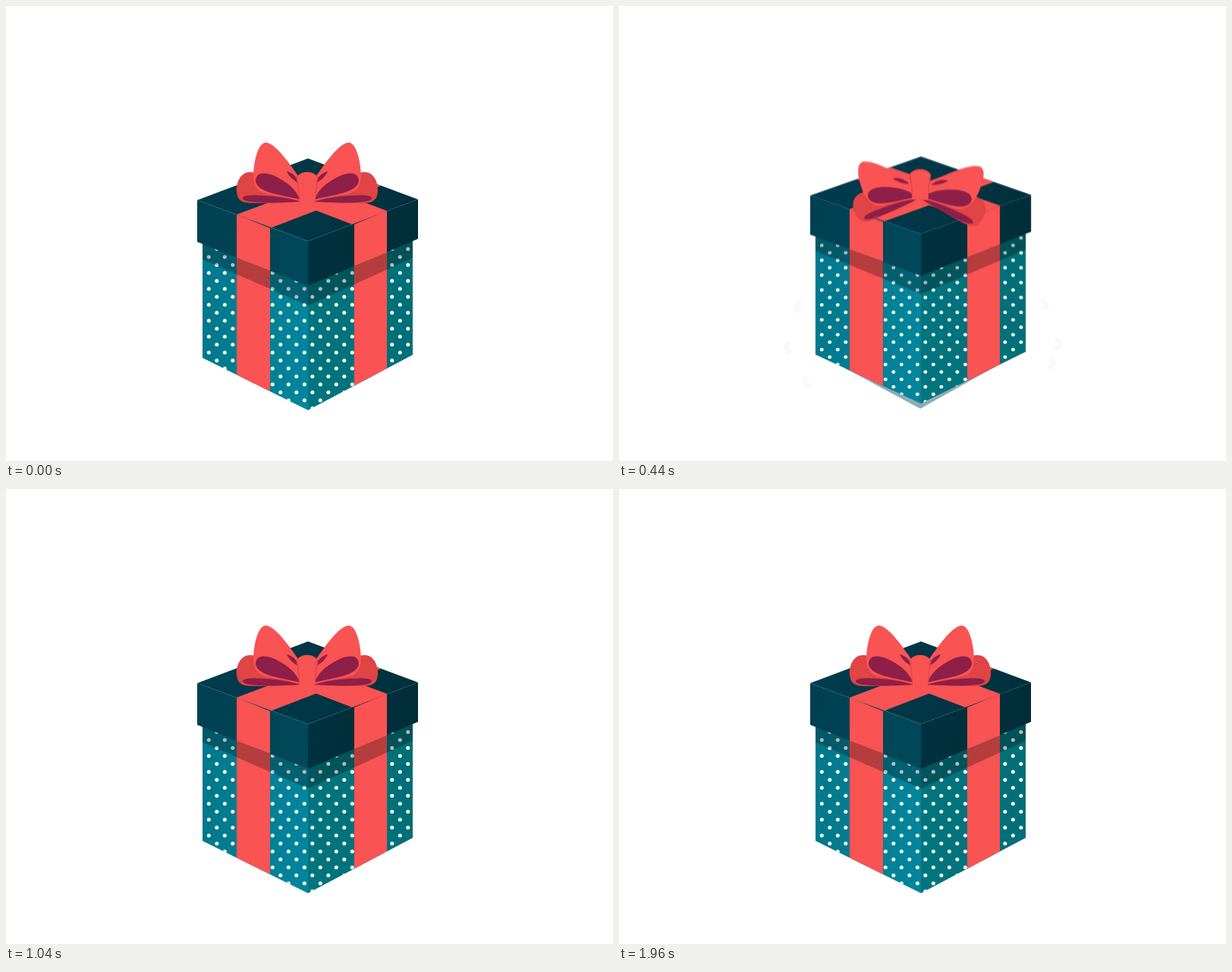
Animation of 800 by 600 pixels, one loop 2 s. Source, as an HTML page with a canvas:

```html
<!DOCTYPE html>
<html lang="en">
<head>
<meta charset="utf-8">
<title>Jumping gift box</title>
<style>
html, body { margin: 0; width: 100%; height: 100%; overflow: hidden; background: #fff; }
canvas { display: block; width: 800px; height: 600px; }
</style>
</head>
<body>
<canvas id="stage" width="800" height="600"></canvas>
<script>
const LOOP = 2000, STEP = 40, SHUTTER = 20, SAMPLES = 8;
const RED = '#f95353', PLUM = '#8e1f49';

// time, scale x, scale y, hop, lid lift, bow turn (degrees), bow scale, shadow scale
const keys = [
  [0, 1, 1, 0, 0, 0, 1, .72],
  [80, .98, 1.02, -9, -15, 0, .98, .85],
  [160, .93, 1.07, -15, -37, 0, .95, 1.02],
  [240, .95, 1.06, -30, -59, 0, .95, 1.18],
  [320, .98, 1, -12, -30, 5, 1, .95],
  [380, 1.03, .92, -3, -12, -14, 1, .72],
  [440, 1, .935, -9, -16.5, -25, 1, .72],
  [500, 1, .97, -2, -5, -12, 1, .72],
  [560, 1, 1, 0, 0, 4, 1, .72],
  [620, 1, 1, 0, 0, 8, 1, .72],
  [720, 1, 1, 0, 0, 0, 1, .72]
];

const screen = document.getElementById('stage').getContext('2d');
const buffer = document.createElement('canvas');
buffer.width = 800;
buffer.height = 600;
const c = buffer.getContext('2d');

// Smooth curve through the keys
function pose(t) {
  const last = keys.length - 1;
  t = Math.max(0, Math.min(t, keys[last][0]));
  let i = 0;
  while (i < last - 1 && t >= keys[i + 1][0]) i++;
  const a = keys[i], b = keys[i + 1], span = b[0] - a[0], u = (t - a[0]) / span;
  const slope = (k, n) => k === 0 || k === last ? 0
    : (keys[k + 1][n] - keys[k - 1][n]) / (keys[k + 1][0] - keys[k - 1][0]);
  return a.map((v, n) => {
    const d = b[n] - v, p = slope(i, n) * span, q = slope(i + 1, n) * span;
    return v + u * (p + u * (3 * d - 2 * p - q + u * (p + q - 2 * d)));
  });
}

function poly(fill, ...pts) {
  c.beginPath();
  for (let i = 0; i < pts.length; i += 2) c.lineTo(pts[i], pts[i + 1]);
  c.closePath();
  c.fillStyle = fill;
  c.fill();
}

function blend(x0, x1, from, to) {
  const g = c.createLinearGradient(x0, 0, x1, 0);
  g.addColorStop(0, from);
  g.addColorStop(1, to);
  return g;
}

function shape(fill, path) {
  c.fillStyle = fill;
  c.fill(new Path2D(path));
}

function body(lift) {
  const top = 290 + lift;
  c.save();
  c.beginPath();
  [[259, top], [398, top + 40], [536, top], [536, 460], [398, 533], [259, 464]]
    .forEach(p => c.lineTo(...p));
  c.clip();
  c.fillStyle = blend(259, 398, '#00788c', '#00869d');
  c.fillRect(250, 200, 148, 340);
  c.fillStyle = blend(398, 536, '#00757f', '#006f77');
  c.fillRect(398, 200, 148, 340);
  c.fillStyle = '#fff';
  for (let i = 0; i < 26; i++) {
    for (let j = -6; j < 10; j++) {
      c.beginPath();
      c.arc(267.3 + 10.5 * i, 331 + 21 * j + 10.5 * (i % 2), 2.5, 0, 7);
      c.fill();
    }
  }
  c.fillStyle = RED;
  c.fillRect(304, 200, 44, 340);
  c.fillRect(459, 200, 43, 340);
  c.translate(0, lift);
  poly('rgba(0,0,0,.27)', 259, 300, 398, 350, 536, 300, 536, 332, 398, 395, 259, 334);
  c.restore();
}

function lid() {
  poly(blend(252, 543, '#003c4f', '#00303d'), 398, 201, 543, 255, 398, 310, 252, 256);
  poly(RED, 304, 275, 450, 220, 494, 237, 348, 293);
  poly(RED, 502, 270, 357, 216, 313, 233, 459, 289);
  poly(blend(252, 398, '#003f50', '#00495a'), 252, 256, 398, 310, 398, 369, 252, 311);
  poly(blend(398, 543, '#00313e', '#002d39'), 398, 310, 543, 255, 543, 307, 398, 369);
  poly(RED, 304, 275, 348, 293, 348, 349, 304, 332);
  poly(RED, 459, 288, 502, 270, 502, 325, 459, 343);
}

function loops(side, turn, size) {
  c.save();
  c.translate(397, 245);
  c.scale(side * size, size);
  c.rotate(turn * Math.PI / 180);
  c.translate(-397, -245);
  shape('#e04444', 'M328 220C311 215 303 231 304 245C305 257 312 260 325 260C345 260 370 259 390 258L380 230Z');
  shape(PLUM, 'M312 254C312 249 325 249 340 250C360 251 375 254 388 258C360 260 314 261 312 254Z');
  shape(RED, 'M387 227C374 208 356 182 343 180C332 180 327 204 326 222C326 243 336 247 350 249C365 251 378 254 390 258Z');
  shape(PLUM, 'M387 255C365 249 330 247 329 230C330 217 345 219 358 226C371 233 383 242 387 255Z');
  shape(PLUM, 'M370 218C377 220 383 224 386 234C379 230 373 225 370 218Z');
  c.restore();
}

function bow(turn, size) {
  loops(1, turn, size);
  loops(-1, turn < 0 ? turn * 1.2 : turn, size);
  shape('#d94444', 'M382.5 227C387 216 407 216 411.500 227C409 240 408 250 408 260L386 260C386 248 385 238 382.500 227Z');
  shape(RED, 'M384 226C388 217 406 217 410 226C408 240 407 250 407 262L387 262C387 248 386 238 384 226Z');
}

// Barely visible dust drifting outwards after the landing
function dust(t) {
  const u = (t - 390) / 650;
  if (u <= 0 || u >= 1) return;
  c.strokeStyle = `rgba(90,150,165,${.05 * (1 - u)})`;
  c.lineWidth = 5;
  for (const a of [-.45, .05, .3, 2.6, 3.05, 3.55]) {
    const r = 150 + 75 * Math.sqrt(u);
    c.beginPath();
    c.arc(400 + r * Math.cos(a), 440 + r * .6 * Math.sin(a), 8 + 14 * u, a - 1, a + 1);
    c.stroke();
  }
}

function scene(t) {
  const [, sx, sy, hop, lift, turn, size, shade] = pose(t);
  c.fillStyle = '#fff';
  c.fillRect(0, 0, 800, 600);
  dust(t);
  const w = 139 * shade, h = 75 * shade;
  poly('#8cadb6', 397 - w, 477, 397, 477 - h, 397 + w, 475, 397, 477 + h);
  c.save();
  c.translate(397.5, 533 + hop);
  c.scale(sx, sy);
  c.translate(-397.5, -533);
  body(lift);
  c.translate(0, lift);
  lid();
  bow(turn, size);
  c.restore();
}

function frame(now) {
  const t = Math.floor(now % LOOP / STEP) * STEP;
  // Averaging several moments gives the motion blur
  const count = t > 0 && t < 720 ? SAMPLES : 1;
  for (let k = 0; k < count; k++) {
    scene(t + (count > 1 ? SHUTTER * (k / (count - 1) - .5) : 0));
    screen.globalAlpha = 1 / (k + 1);
    screen.drawImage(buffer, 0, 0);
  }
}

const start = performance.now();
function tick() {
  frame(performance.now() - start);
  requestAnimationFrame(tick);
}
tick();
</script>
</body>
</html>
```
